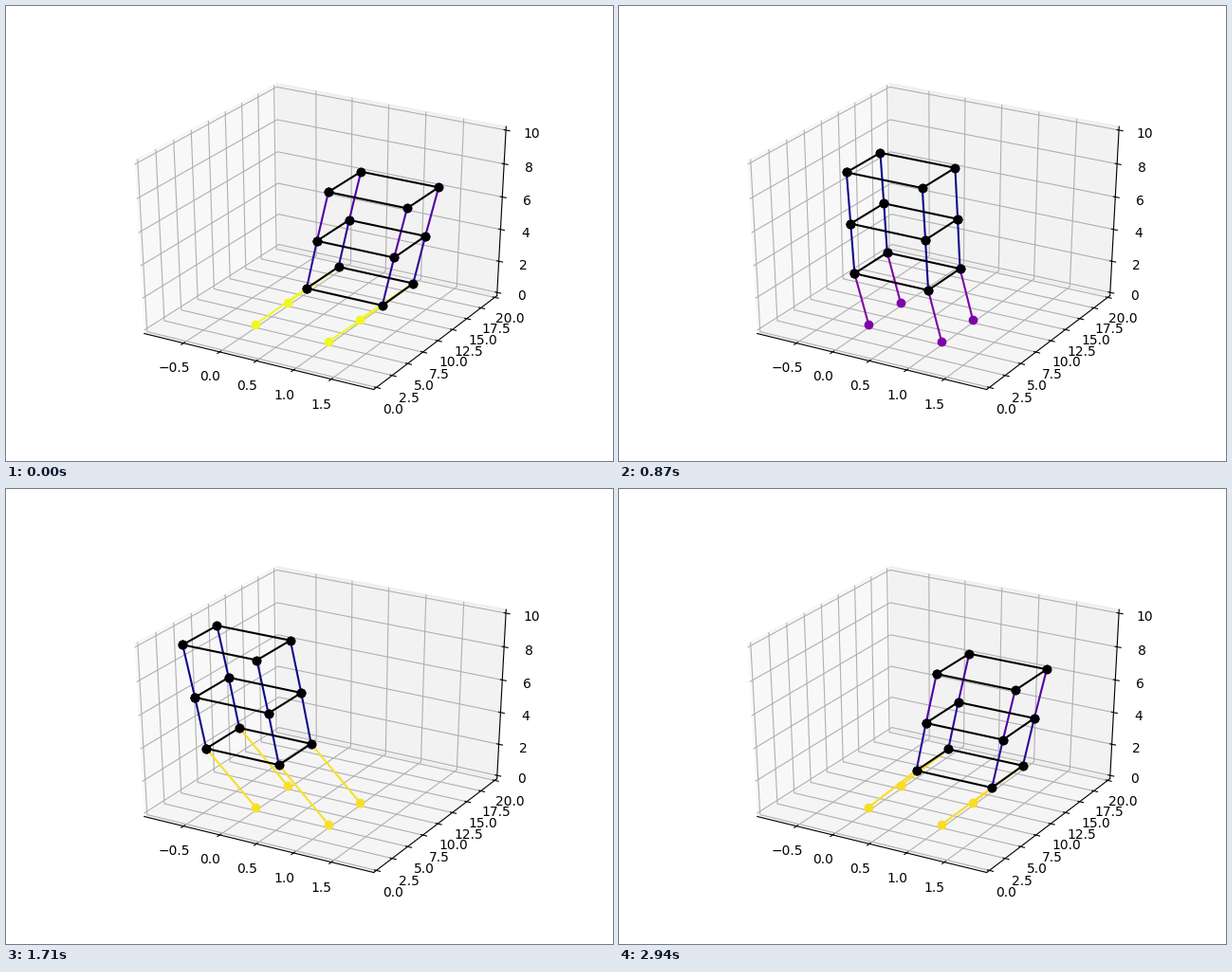
Recreate the animation shown at these times as a matplotlib script. Size 640 by 480 pixels, loop 2970 ms.

```python
import numpy as np
import matplotlib.pyplot as plt
from matplotlib.animation import FuncAnimation

FRAMES, INTERVAL = 99, 30
OMEGA, PHASE = 0.0592, 0.11          # sway, radians per frame
SHAPE = np.array([0, 0.71, 0.85, 1])  # sideways reach of each level
TINT = (0.06, 0.14)                   # colour strength of the upper columns
LEVELS = np.array([0, 3, 6, 9])
CORNERS = [(0, 5), (1, 5), (1, 10), (0, 10)]
MARGIN = 1 / 48

plasma = plt.get_cmap("plasma")
fig = plt.figure(figsize=(6.4, 4.8), dpi=100)
ax = fig.add_subplot(projection="3d")
# Unit cube stretched over the whole subplot rectangle
ax.apply_aspect = lambda position=None: None
ax.set_box_aspect((1, 1, 1), zoom=np.sqrt(3) / 1.8294640721620434)
ax.view_init(elev=30, azim=-60)

ax.set_xticks(np.arange(-0.5, 1.6, 0.5))
ax.set_yticks(np.arange(0, 20.1, 2.5))
ax.set_zticks(np.arange(0, 11, 2))
ax.set_xlim(-0.99, 1.99, view_margin=MARGIN)
ax.set_ylim(0, 20, view_margin=MARGIN)
ax.set_zlim(0, 10, view_margin=MARGIN)


def new_line(color):
    return ax.plot([], [], [], "o-", color=color, lw=1.5, ms=6)[0]


columns = [[new_line(plasma(0.0)) for _ in CORNERS] for _ in range(3)]
floors = [new_line("black") for _ in range(3)]


def update(k):
    sway = np.cos(OMEGA * k + PHASE)
    shift = SHAPE * sway
    tints = [abs(sway)] + [max(sway, 0) * t for t in TINT]

    for i, (story, tint) in enumerate(zip(columns, tints)):
        for line, (x, y) in zip(story, CORNERS):
            line.set_data_3d(x + shift[i:i + 2], [y, y], LEVELS[i:i + 2])
            line.set_color(plasma(float(tint)))

    ring = np.array(CORNERS + CORNERS[:1])
    for line, dx, z in zip(floors, shift[1:], LEVELS[1:]):
        line.set_data_3d(ring[:, 0] + dx, ring[:, 1], np.full(len(ring), z))
    return sum(columns, []) + floors


anim = FuncAnimation(fig, update, frames=FRAMES, interval=INTERVAL,
                     repeat=True, repeat_delay=0, blit=False)
plt.show()
```
